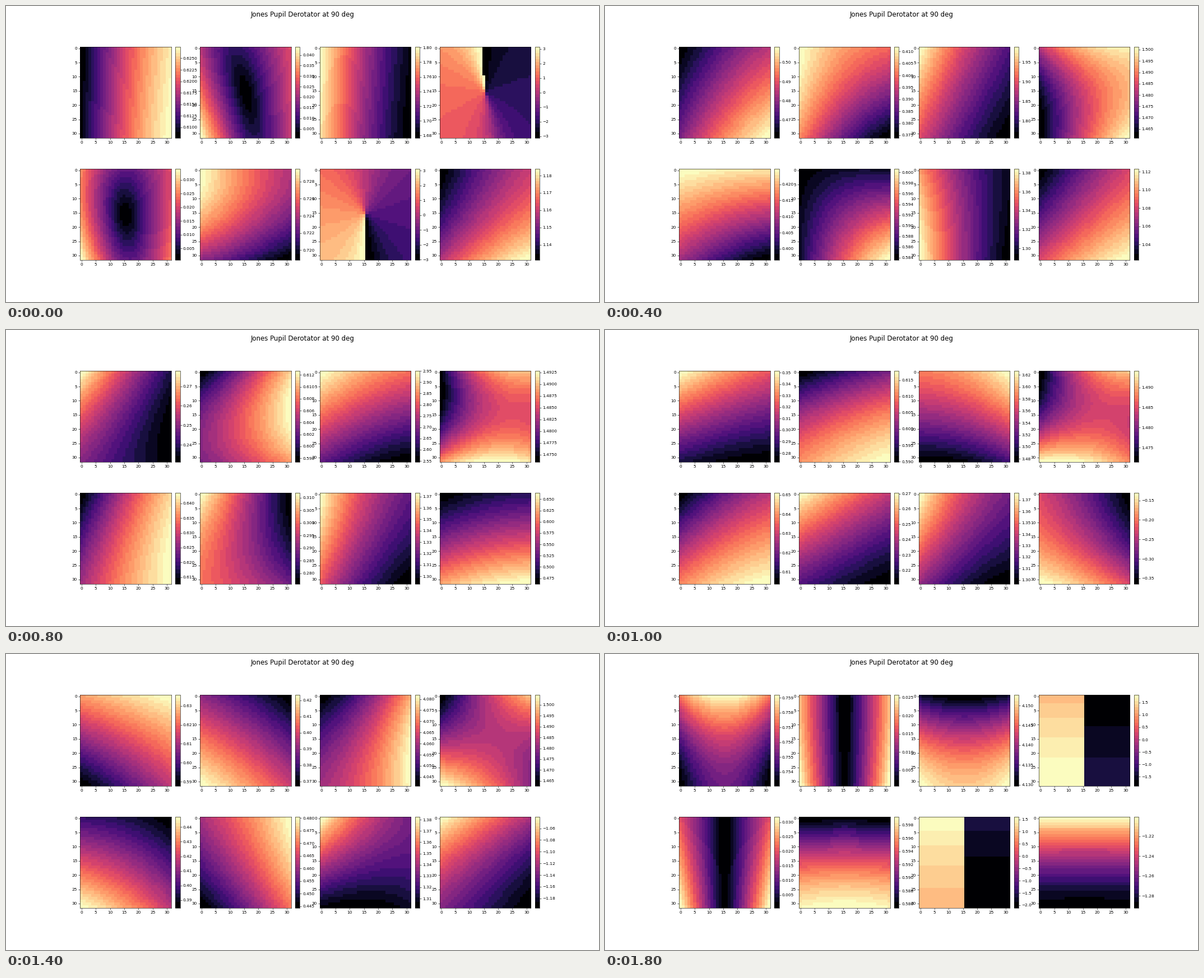
These frames come from a looping animation (1058x529 px, 2000 ms). A matplotlib script:

```python
import numpy as np
import matplotlib.pyplot as plt
from matplotlib.animation import FuncAnimation
from matplotlib.colors import ListedColormap

WIDTH, HEIGHT, DPI = 1058, 529, 52.9
FRAMES, INTERVAL = 10, 200
SIZE, BAR_WIDTH = 162.4, 8.2
LEFT, COLUMN_STEP, BAR_OFFSET = 132.25, 213.9, 170.05
ROW_TOPS = (73.2, 291.2)

plt.rcParams["font.family"] = "DejaVu Sans"

# Pupil coordinates: U to the right, V downwards, both from -1 to 1.
axis = np.linspace(-1, 1, 32)
U, V = np.meshgrid(axis, axis)

# Reflection of the derotator along its two own axes, and the fixed optics.
P_CENTRE = -0.098 + 0.612j
Q_CENTRE = 0.408 + 0.637j
GAIN_X = np.exp((0.001 - 0.004j) * V)
GAIN_Y = (0.947 + 0.1495j) * np.exp((-0.0036 + 0.0123j) * V)


def jones(angle):
    """Jones pupil xx, xy, yx, yy with the derotator turned by an angle."""
    c, s = np.cos(angle), np.sin(angle)
    c2, s2 = np.cos(2 * angle), np.sin(2 * angle)
    w, t = U * c + V * s, V * c - U * s

    p = P_CENTRE * np.exp((0.015 - 0.058j) * w + (-0.003 + 0.009j) * w**2)
    q = Q_CENTRE * np.exp((-0.0037 + 0.014j) * w
                          + (0.0009 - 0.003j) * w**2
                          + (-0.0018 + 0.003j) * t**2)
    mean, half = (p + q) / 2, (p - q) / 2

    # Sum and difference of the tilts of the frame before and after.
    total = (-0.038 * (U * c2 + V * s2) - 0.005 * w * t
             + 0.005 * (U * c)**2)
    split = (-0.015 * U + 0.021 * V + 0.007 * U * V - 0.0215 * w * t
             - 0.025 * (U * c2 + V * s2) + 0.021 * (V * c2 - U * s2))

    turn = 2 * angle + total
    xx = GAIN_X * (mean * np.cos(turn) + half * np.cos(split))
    yx = GAIN_X * (mean * np.sin(turn) + half * np.sin(split))
    xy = GAIN_Y * (mean * np.sin(turn) - half * np.sin(split))
    yy = GAIN_Y * (mean * np.cos(turn) - half * np.cos(split))
    return xx, xy, yx, yy


def panels(step):
    xx, xy, yx, yy = jones(np.radians(90 * step / (FRAMES - 1)))
    return (abs(xx), abs(xy), np.angle(xx) % (2 * np.pi), np.angle(xy),
            abs(yx), abs(yy), np.angle(yx), np.angle(yy))


def banded_magma(levels=26, power=0.85):
    """Magma in flat bands that are a little wider at the dark end."""
    band = np.floor(np.linspace(0, 1, 256) ** (1 / power) * levels)
    band = np.minimum(band, levels - 1) / (levels - 1)
    return ListedColormap(plt.get_cmap("magma")(band ** power))


def add_box(fig, x, top, width):
    return fig.add_axes((x / WIDTH, 1 - (top + SIZE) / HEIGHT,
                         width / WIDTH, SIZE / HEIGHT))


fig = plt.figure(figsize=(WIDTH / DPI, HEIGHT / DPI), dpi=DPI,
                 facecolor="white")
fig.suptitle("Jones Pupil Derotator at 90 deg", fontsize=16, y=0.983)
cmap = banded_magma()
images = []
for index, data in enumerate(panels(0)):
    row, column = divmod(index, 4)
    x = LEFT + column * COLUMN_STEP
    ax = add_box(fig, x, ROW_TOPS[row], SIZE)
    image = ax.imshow(data, cmap=cmap, aspect="auto")
    fig.colorbar(image, cax=add_box(fig, x + BAR_OFFSET, ROW_TOPS[row],
                                    BAR_WIDTH))
    images.append(image)


def update(step):
    for image, data in zip(images, panels(step)):
        image.set_data(data)
        image.autoscale()  # moves both limits at once
    return images


animation = FuncAnimation(fig, update, frames=FRAMES, interval=INTERVAL,
                          init_func=lambda: update(0), repeat=True,
                          repeat_delay=0, blit=False)
plt.show()
```
